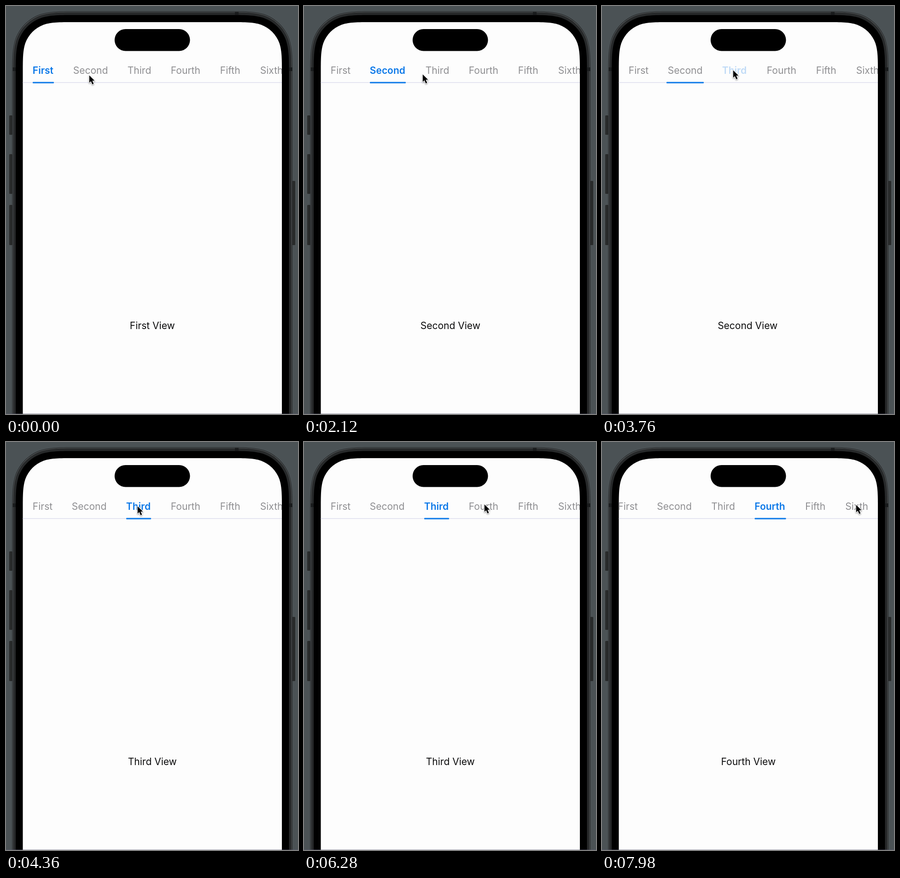
These frames come from a looping animation (634x884 px, 8000 ms). An HTML page with a canvas:

```html
<!DOCTYPE html>
<html lang="en">
<head>
<meta charset="utf-8">
<title>Scrollable tabs</title>
<style>
  html, body { margin: 0; width: 100%; height: 100%; overflow: hidden; background: #4b5255; }
  canvas { display: block; width: 634px; height: 884px; }
</style>
</head>
<body>
<canvas id="stage" width="634" height="884"></canvas>
<script>
const ctx = document.getElementById('stage').getContext('2d');
const LOOP = 8000;
const BLUE = '#0b78e8', GRAY = '#8e8e91', INK = '#0b0b0c', SCREEN = '#fdfdfd';
const SCREEN_LEFT = 36.5, SCREEN_WIDTH = 562.5, BOLD_EXTRA = 3;

// x: left edge while no earlier tab is bold; width: bold label width
const tabs = [
  { name: 'First', x: 58, width: 46 },
  { name: 'Second', x: 143, width: 78 },
  { name: 'Third', x: 261, width: 54 },
  { name: 'Fourth', x: 355, width: 68 },
  { name: 'Fifth', x: 462, width: 46 },
  { name: 'Sixth', x: 549, width: 52 }
];
const taps = [1255, 3640, 6438];
const SCROLL_END = 23.5;

// Pointer stops: time, x, y
const pointerStops = [
  [0, 180, 149], [300, 180, 149], [800, 175, 147], [1720, 175, 147],
  [2120, 257, 147], [2650, 284, 138], [4300, 284, 138],
  [5200, 387, 133], [5700, 387, 133], [6100, 391, 134],
  [7200, 391, 134], [7940, 551, 135], [8000, 551, 135]
];

const clamp = v => Math.min(1, Math.max(0, v));
const lerp = (a, b, k) => a + (b - a) * k;

function bezier(x1, y1, x2, y2) {
  const at = (a, b, s) => 3 * a * s * (1 - s) ** 2 + 3 * b * s * s * (1 - s) + s ** 3;
  return u => {
    if (u <= 0) return 0;
    if (u >= 1) return 1;
    let lo = 0, hi = 1;
    for (let i = 0; i < 24; i++) {
      const mid = (lo + hi) / 2;
      if (at(x1, x2, mid) < u) lo = mid; else hi = mid;
    }
    return at(y1, y2, lo);
  };
}
const ease = bezier(0.25, 0.1, 0.25, 1);
const easeInOut = bezier(0.42, 0, 0.58, 1);

function fillRound(color, x, y, w, h, r) {
  ctx.fillStyle = color;
  ctx.beginPath();
  ctx.roundRect(x, y, w, h, r);
  ctx.fill();
}
function fillRect(color, ...box) {
  ctx.fillStyle = color;
  ctx.fillRect(...box);
}
function text(label, x, y, color, weight = 400, align = 'left') {
  ctx.font = `${weight} 21px Inter, "Liberation Sans", sans-serif`;
  ctx.textAlign = align;
  ctx.fillStyle = color;
  ctx.fillText(label, x, y);
}

// Body with smooth, continuous-curvature top corners, open past the bottom edge
function fillBody(color, x, y, w, r) {
  const reach = 1.5287 * r, c = 1.0885 * r, d = 0.8684 * r;
  const e = 0.6315 * r, f = 0.0749 * r, g = 0.3728 * r, h = 0.1691 * r;
  const right = x + w;
  ctx.beginPath();
  ctx.moveTo(x, 900);
  ctx.lineTo(x, y + reach);
  ctx.bezierCurveTo(x, y + c, x, y + d, x + f, y + e);
  ctx.bezierCurveTo(x + h, y + g, x + g, y + h, x + e, y + f);
  ctx.bezierCurveTo(x + d, y, x + c, y, x + reach, y);
  ctx.lineTo(right - reach, y);
  ctx.bezierCurveTo(right - c, y, right - d, y, right - e, y + f);
  ctx.bezierCurveTo(right - g, y + h, right - h, y + g, right - f, y + e);
  ctx.bezierCurveTo(right, y + d, right, y + c, right, y + reach);
  ctx.lineTo(right, 900);
  ctx.fillStyle = color;
  ctx.fill();
}

function drawPhone() {
  fillRect('#4b5255', 0, 0, 634, 884);
  for (const [x, y, h] of [[7, 237, 42], [7, 321, 86], [7, 431, 87], [621, 379, 139]])
    fillRound('#292b2b', x, y, 7, h, 1.5);
  fillBody('#1b1d1e', 13.5, 11.5, 608.5, 95);
  fillBody('#5d6163', 14.5, 12.5, 606.5, 94);
  fillBody('#27292a', 15.5, 13.5, 604.5, 93);
  for (const [x, y, w, h] of [[497, 13, 8, 6], [15, 133, 6, 8], [615, 133, 6, 8]])
    fillRect('#191b1c', x, y, w, h);
  fillBody('#000', 21, 19.5, 593.5, 87);
}

function drawTabs(selected, since) {
  const moving = selected > 0;
  const from = tabs[Math.max(0, selected - 1)], to = tabs[selected];
  const fade = moving ? easeInOut(since / 350) : 1;
  const scroll = selected === 3 ? SCROLL_END * fade : 0;

  ctx.save();
  ctx.translate(-scroll, 0);
  tabs.forEach((tab, i) => {
    const x = tab.x + (i > selected ? BOLD_EXTRA : 0);
    const active = i === selected;
    ctx.globalAlpha = active ? fade : 1;
    text(tab.name, x - 0.2, 146.5, active ? BLUE : GRAY, active ? 600 : 400);
  });
  ctx.globalAlpha = 1;

  fillRect('#dddeee', 0, 165, 700, 1.5);
  const k = moving ? ease((since - 128) / 330) : 1;
  const left = lerp(from.x - BOLD_EXTRA, to.x, k);
  const right = lerp(from.x + from.width, to.x + to.width, k);
  fillRound(BLUE, left, 164.5, right - left, 3, 1);
  ctx.restore();
}

function drawPages(selected, since) {
  const position = selected ? selected - 1 + ease((since - 119) / 300) : 0;
  tabs.forEach((tab, i) => {
    if (Math.abs(i - position) < 1)
      text(tab.name + ' View', 317.8 + (i - position) * SCREEN_WIDTH, 700, INK, 400, 'center');
  });
}

function drawPointer(t) {
  const next = Math.max(1, pointerStops.findIndex(stop => stop[0] > t));
  const [t0, x0, y0] = pointerStops[next - 1], [t1, x1, y1] = pointerStops[next];
  const k = easeInOut(clamp((t - t0) / (t1 - t0)));
  ctx.save();
  ctx.translate(lerp(x0, x1, k) + 0.8, lerp(y0, y1, k) + 1.2);
  ctx.scale(0.92, 0.92);
  const arrow = new Path2D('M0 0V17.5L4 13.8L7.2 21.2L10.4 19.8L7.2 12.6H12.6Z');
  ctx.lineWidth = 2.4;
  ctx.lineJoin = 'round';
  ctx.strokeStyle = '#fff';
  ctx.shadowColor = 'rgba(0,0,0,.4)';
  ctx.shadowBlur = 3;
  ctx.shadowOffsetY = 1.5;
  ctx.stroke(arrow);
  ctx.shadowColor = 'transparent';
  ctx.fillStyle = '#000';
  ctx.fill(arrow);
  ctx.restore();
}

function draw(t) {
  const selected = taps.filter(tap => t >= tap).length;
  const since = selected ? t - taps[selected - 1] : 0;

  drawPhone();
  ctx.save();
  fillBody(SCREEN, SCREEN_LEFT, 35, SCREEN_WIDTH, 72);
  ctx.clip();
  drawTabs(selected, since);
  drawPages(selected, since);
  ctx.restore();
  fillRound('#000', 235.8, 50, 163.7, 47.5, 23.7);
  fillRect('rgba(96,96,118,.6)', 0, 883, 634, 1);
  drawPointer(t);
}

function tick() {
  draw(performance.now() % LOOP);
  requestAnimationFrame(tick);
}
tick();
</script>
</body>
</html>
```
